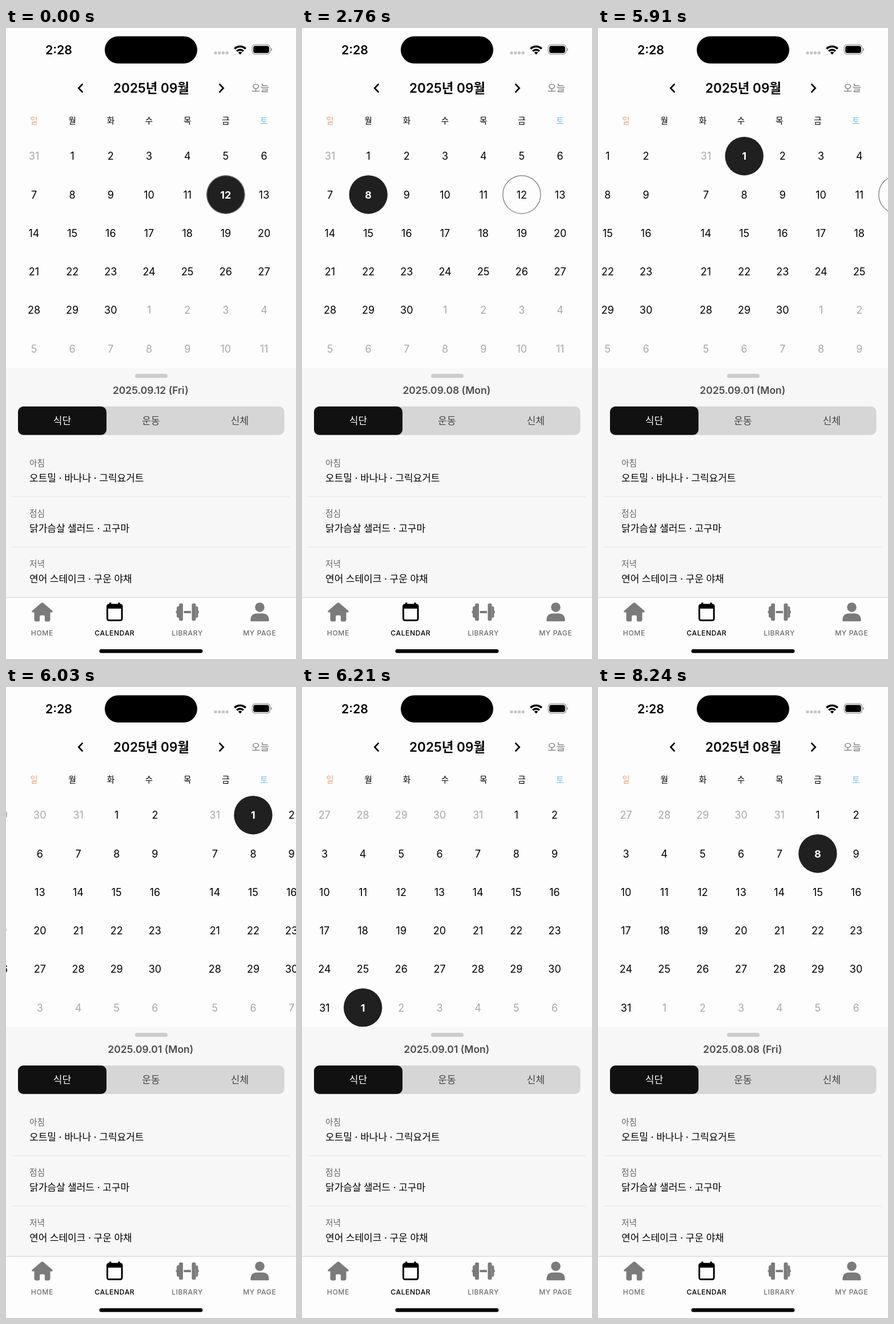
Animation of 508 by 1102 pixels, one loop 8.33 s. Source, as an HTML page:

```html
<!DOCTYPE html>
<html lang="ko">
<head>
<meta charset="utf-8">
<title>Calendar</title>
<style>
html, body { margin: 0; width: 100%; height: 100%; overflow: hidden; background: #fdfdfd; }
svg { display: block; width: 100vw; height: 100vh; font-family: Inter, "Noto Sans CJK KR", "Noto Sans CJK", sans-serif; }
.mid { text-anchor: middle; }
.day { font-size: 18px; }
.week { font-size: 14.6px; font-weight: 500; }
.tab { font-size: 12.2px; font-weight: 500; letter-spacing: .55px; fill: #6e6e6e; }
.seg { font-size: 17px; fill: #444; }
.label { font-size: 14.7px; fill: #666; }
.meal { font-size: 17px; font-weight: 500; }
</style>
</head>
<body>
<svg viewBox="0 0 508 1102">
  <rect width="508" height="1102" fill="#fdfdfd"/>

  <!-- status bar -->
  <text class="mid" x="92.5" y="46" font-size="21.3" font-weight="600">2:28</text>
  <rect x="173" y="14.5" width="162" height="47.5" rx="23.7"/>
  <g fill="#c6c6c6">
    <rect x="364.5" y="41" width="5.2" height="5" rx="1.8"/>
    <rect x="371.2" y="41" width="5.2" height="5" rx="1.8"/>
    <rect x="377.9" y="41" width="5.2" height="5" rx="1.8"/>
    <rect x="384.6" y="41" width="5.2" height="5" rx="1.8"/>
  </g>
  <g fill="none" stroke="#000" stroke-width="3.5">
    <path d="M400.4 36.2a13.6 13.6 0 0 1 19.4 0"/>
    <path d="M404.4 40.4a8 8 0 0 1 11.4 0"/>
  </g>
  <path d="M406.9 43a4.7 4.7 0 0 1 6.4 0l-3.2 3.4z"/>
  <rect x="431.2" y="29.2" width="31.6" height="16.6" rx="5.2" fill="none" stroke="#999" stroke-width="1.3"/>
  <rect x="433.2" y="31.2" width="27.6" height="12.6" rx="3.5"/>
  <path d="M464.2 34.8a3 3 0 0 1 0 5.6z" fill="#999"/>

  <!-- month header -->
  <g fill="none" stroke="#000" stroke-width="2.7">
    <path d="M134.3 97.6l-7 7.4 7 7.4"/>
    <path d="M373.7 97.6l7 7.4-7 7.4"/>
  </g>
  <text id="title" class="mid" x="254.5" y="113" font-size="22.5" font-weight="600"></text>
  <text class="mid" x="445.5" y="111" font-size="16.8" fill="#777">오늘</text>
  <g id="week"></g>
  <g id="pages"><g id="aug" transform="translate(-508)"></g><g id="sep"></g></g>

  <!-- day sheet -->
  <rect y="593.5" width="508" height="402" fill="#f7f7f7"/>
  <rect x="226" y="604" width="57" height="7" rx="3.5" fill="#ccc"/>
  <text id="date" class="mid" x="253.3" y="638.5" font-size="17.5" font-weight="600" fill="#4c4c4c"></text>
  <rect x="21" y="661" width="466.5" height="49.7" rx="9.5" fill="#d6d6d6"/>
  <rect x="21" y="661" width="155" height="49.7" rx="9.5" fill="#111"/>
  <g class="seg mid">
    <text x="98.5" y="692" style="fill:#fff">식단</text>
    <text x="254" y="692">운동</text>
    <text x="409.5" y="692">신체</text>
  </g>
  <g id="meals"></g>

  <!-- tab bar -->
  <rect y="994" width="508" height="108" fill="#fdfdfd"/>
  <path d="M0 994.5h508" stroke="#dcdcdc" stroke-width="1.3"/>
  <g fill="#7b7b7b">
    <path d="M61.6 1004.2q1.9-1.5 3.8 0l15.8 13.6q1.6 1.8-.7 2.7h-3v12.6q0 3.4-3.4 3.4h-4.4q-1.8 0-1.8-1.8v-7q0-2-2-2h-4.8q-2 0-2 2v7q0 1.8-1.8 1.8h-4.4q-3.4 0-3.4-3.4v-12.6h-3q-2.3-.9-.7-2.7z"/>
    <rect x="311.5" y="1018" width="12.5" height="4"/>
    <rect x="303" y="1005" width="7" height="30" rx="2.6"/>
    <rect x="325.5" y="1005" width="7" height="30" rx="2.6"/>
    <path d="M303 1010v20q-4 .5-4-3v-4.7q-1.6-.3-1.6-2.3t1.6-2.3v-4.7q0-3.500 4-3z"/>
    <path d="M332.500 1010v20q4 .5 4-3v-4.700q1.600-.3 1.600-2.300t-1.600-2.300v-4.700q0-3.500-4-3z"/>
    <circle cx="444.500" cy="1011.700" r="8.300"/>
    <path d="M428.300 1034.500q0-12 11.500-12h9.400q11.500 0 11.500 12 0 1.800-1.800 1.800h-28.800q-1.800 0-1.800-1.800z"/>
  </g>
  <rect x="177.500" y="1007.300" width="25.600" height="27.200" rx="3" fill="none" stroke="#000" stroke-width="3"/>
  <path d="M177 1007h27v7h-27zM181 1003.500h3.400v5h-3.400zM196.400 1003.500h3.400v5h-3.400z"/>
  <g class="tab mid">
    <text x="63.300" y="1060.500">HOME</text>
    <text x="190.300" y="1060.500" style="fill:#000">CALENDAR</text>
    <text x="317.600" y="1060.500">LIBRARY</text>
    <text x="444.300" y="1060.500">MY PAGE</text>
  </g>
  <rect x="163.500" y="1085" width="181" height="6.400" rx="3.200"/>
</svg>
<script>
const LOOP = 8330, PAGE = 508, AUG = 7, SEP = 8;
const DAY_NAMES = ['Sun', 'Mon', 'Tue', 'Wed', 'Thu', 'Fri', 'Sat'];
const today = +new Date(2025, SEP, 12);
const $ = id => document.getElementById(id);
const two = n => String(n).padStart(2, '0');
const colX = c => 49 + 67.18 * c;
const rowY = r => 223.7 + 67.25 * r;

// [start time, month, day]
const picks = [[0, SEP, 12], [1550, SEP, 11], [2760, SEP, 8], [5090, SEP, 1], [8240, AUG, 8]];

$('week').innerHTML = [...'일월화수목금토'].map((name, i) => {
  const color = i == 0 ? '#e2a57d' : i == 6 ? '#6cc3ea' : '#000';
  return `<text class="week mid" x="${colX(i)}" y="167" fill="${color}">${name}</text>`;
}).join('');

$('meals').innerHTML = [
  ['아침', '오트밀 · 바나나 · 그릭요거트'],
  ['점심', '닭가슴살 샐러드 · 고구마'],
  ['저녁', '연어 스테이크 · 구운 야채']
].map(([label, meal], i) => `<g transform="translate(0 ${88 * i})">
  <text class="label" x="41" y="765">${label}</text>
  <text class="meal" x="41" y="792">${meal}</text>
  <path d="M10 818.5h487" stroke="#e9e9e9" stroke-width="1.5"/></g>`).join('');

function monthGrid(month, picked) {
  const lead = new Date(2025, month, 1).getDay();
  let out = '';
  for (let i = 0; i < 42; i++) {
    const date = new Date(2025, month, 1 - lead + i);
    const x = colX(i % 7), y = rowY(Math.floor(i / 7));
    const on = +date == picked;
    const color = on ? '#fff' : date.getMonth() == month ? '#000' : '#a9a9a9';
    if (on) out += `<circle cx="${x}" cy="${y}" r="33.7" fill="#202020"/>`;
    if (+date == today) out += `<circle cx="${x}" cy="${y}" r="33.1" fill="none" stroke="#777" stroke-width="1.2"/>`;
    out += `<text class="day mid" x="${x}" y="${y + 6.6}" fill="${color}" font-weight="${on ? 700 : 400}">${date.getDate()}</text>`;
  }
  return out;
}

// Finger drag, then a damped spring onto the previous month.
function scrollAt(t) {
  t = Math.floor(t / 30) * 30;
  if (t < 5795) return 0;
  if (t >= 6390) return PAGE;
  if (t < 5910) { const u = t - 5795; return .985 * u + .00202 * u * u; }
  if (t < 6030) return 140 + 1.473 * (t - 5910);
  const u = t - 6030;
  return PAGE - 191.2 * (1 + .01645 * u) * Math.exp(-.0243 * u);
}

let shown;
function draw(now) {
  const t = now % LOOP;
  const pick = picks.filter(p => p[0] <= t).pop();
  if (pick != shown) {
    shown = pick;
    const date = new Date(2025, pick[1], pick[2]);
    $('aug').innerHTML = monthGrid(AUG, +date);
    $('sep').innerHTML = monthGrid(SEP, +date);
    $('date').textContent = `2025.${two(pick[1] + 1)}.${two(pick[2])} (${DAY_NAMES[date.getDay()]})`;
  }
  $('title').textContent = `2025년 ${t < 6390 ? '09' : '08'}월`;
  $('pages').setAttribute('transform', `translate(${scrollAt(t).toFixed(2)})`);
}

const start = performance.now();
function tick() {
  draw(performance.now() - start);
  requestAnimationFrame(tick);
}
tick();
</script>
</body>
</html>
```
